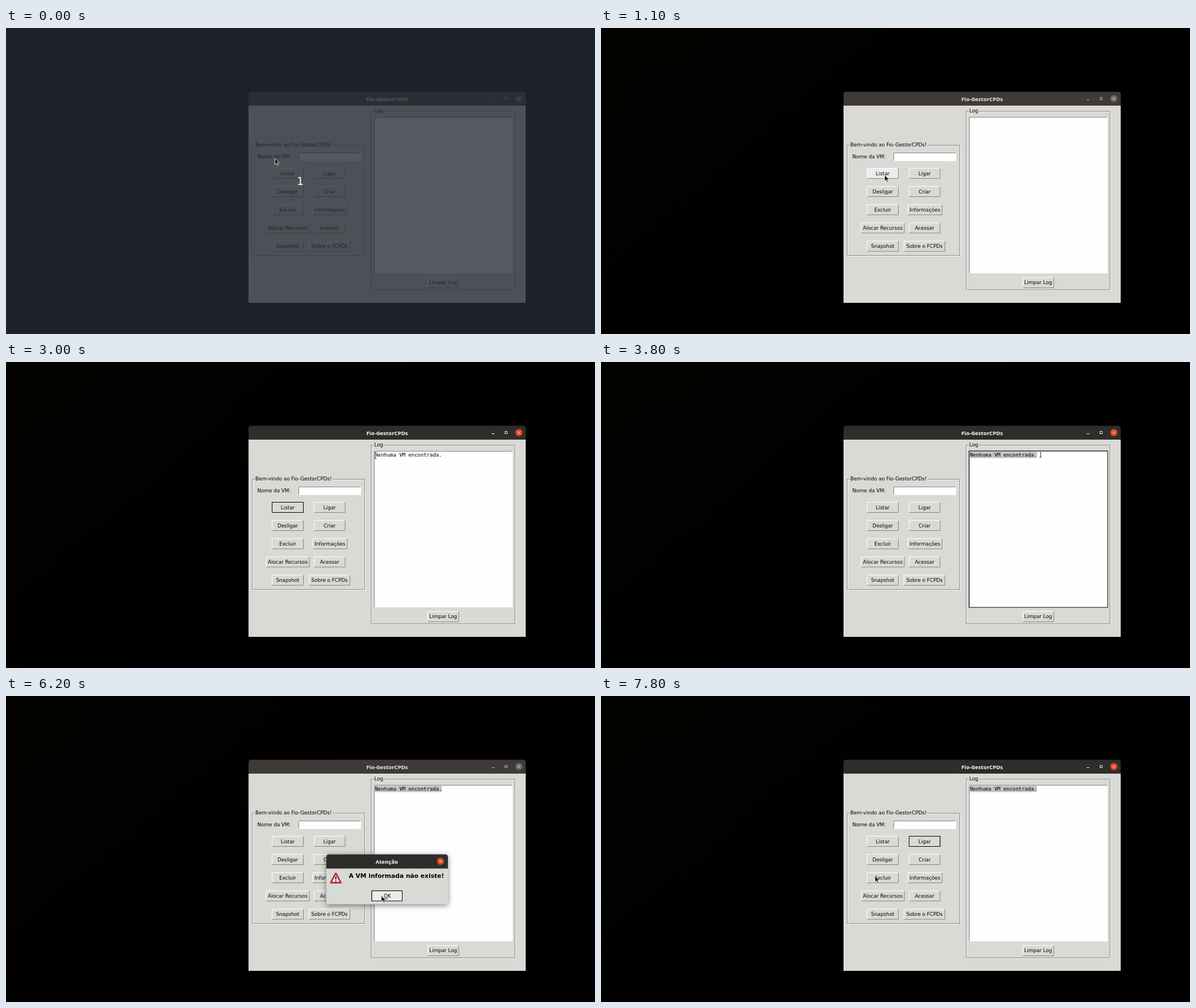
An HTML page that plays this animation: 1037x540 px, repeating every 8000 ms.

```html
<!DOCTYPE html>
<html lang="pt-BR">
<head>
<meta charset="utf-8">
<title>Fio-GestorCPDs</title>
<style>
  html, body { margin: 0; width: 100%; height: 100%; overflow: hidden; background: #000; }
  svg { display: block; width: 1037px; height: 540px; }
  text { font: 8.78px "DejaVu Sans", sans-serif; fill: #000; white-space: pre; }
  .mid { text-anchor: middle; }
  .title { font: bold 9.6px "Noto Sans", sans-serif; fill: #fff; }
  .mono { font: 8.91px "DejaVu Sans Mono", monospace; }
  .msg { font: bold 10.73px "DejaVu Sans", sans-serif; }
  .count { font-size: 19px; fill: #fff; }
  .face { fill: #d9dad6; }
  .light, .dark, .ring { fill: none; stroke-width: 1; }
  .light { stroke: #fff; }
  .dark { stroke: #84857f; }
  .ring { stroke: #000; visibility: hidden; }
  .focus > .ring { visibility: visible; }
  .hover > .face { fill: #ececec; }
  .press > .light { stroke: #84857f; }
  .press > .dark { stroke: #fff; }
  .press > text { transform: translate(.7px, .7px); }
  .bar { fill: #2f2d2c; }
  .close { fill: #e2481f; }
  .ctl { fill: none; stroke: #f2f2f2; }
  .idle .bar { fill: #3f3a38; }
  .idle .close { fill: #6b6765; }
  .idle .ctl { stroke: #b9b6b4; }
  .idle .title { fill: #eee; }
  .idle .x { stroke: #f2f2f2; }
  .shade { filter: drop-shadow(0 2px 5px rgba(0, 0, 0, .5)); }
</style>
</head>
<body>
<svg viewBox="0 0 1037 540">
  <defs>
    <linearGradient id="wall" x2="1" y2=".6">
      <stop stop-color="#040300"/><stop offset=".6" stop-color="#000"/>
    </linearGradient>
  </defs>
  <rect width="1037" height="540" fill="url(#wall)"/>
  <rect y="538" width="1037" height="2" fill="#0b0208"/>

  <g id="main">
    <path class="bar" d="M427 137.500V117q0-4.500 4.500-4.500H910.500q4.500 0 4.500 4.500v20.500z"/>
    <rect class="face" x="427" y="137" width="488" height="348"/>
    <text class="title mid" x="671" y="128.500">Fio-GestorCPDs</text>
    <path class="ctl" d="M855 126.500h5M878.500 122.500h4v4h-4z"/>
    <circle class="close" cx="903" cy="124.500" r="6.200"/>
    <path class="ctl x" d="M900.800 122.300l4.400 4.400m0-4.400l-4.400 4.400"/>
    <g id="groups"></g>
    <text x="442.500" y="230">Nome da VM:</text>
    <g id="entry"></g>
    <g id="log"></g>
    <rect id="sel" x="649.500" y="158.500" height="11" fill="#c3c3c3"/>
    <text id="line" class="mono" x="649.500" y="167.200">Nenhuma VM encontrada.</text>
    <g id="buttons"></g>
  </g>

  <g id="dialog">
    <g class="shade">
      <path class="bar" d="M564 305V284q0-4.500 4.500-4.500H773.500q4.500 0 4.500 4.500v21z"/>
      <rect class="face" x="564" y="304.500" width="214" height="63"/>
    </g>
    <text class="title mid" x="670.500" y="296">Atenção</text>
    <circle class="close" cx="765" cy="291.700" r="6.200"/>
    <path class="ctl" d="M762.800 289.500l4.400 4.400m0-4.400l-4.400 4.400"/>
    <path d="M580.700 313.500L589 329H572.400z" fill="#fff" stroke="#8d1416" stroke-width="3.400" stroke-linejoin="round"/>
    <path d="M580.700 313.500L589 329H572.400z" fill="#eee" stroke="#d5282a" stroke-width="2" stroke-linejoin="round"/>
    <path d="M580.700 318.800v5m0 1.800v1.900" stroke="#111" stroke-width="2"/>
    <text class="msg" x="603.500" y="320.500">A VM informada não existe!</text>
    <g id="okSlot"></g>
  </g>

  <g id="intro">
    <rect width="1037" height="540" fill="#262b34" fill-opacity=".78"/>
    <text class="count mid" x="518" y="277">1</text>
  </g>

  <g id="cursor">
    <path id="arrow" d="M.3.300V11.300L2.900 9 4.700 13 6.600 12.200 4.900 8.300H8.200z" fill="#111" stroke="#fff" stroke-width=".8"/>
    <g id="beam" fill="none">
      <path d="M-2-6H2M0-6V6M-2 6H2" stroke="#fff" stroke-width="2.400"/>
      <path d="M-2-6H-.700L0-5.300.700-6H2M0-5.300V5.300M-2 6H-.700L0 5.300.700 6H2" stroke="#111"/>
    </g>
    <path id="sizer" d="M0-6.500L3-2H-3zM0 6.500L3 2H-3z" fill="#111" stroke="#fff" stroke-width=".5"/>
  </g>
</svg>
<script>
const LOOP = 8000, CHAR = 5.364;
const el = id => document.getElementById(id);

// Two-tone bevel: top-left corner and bottom-right corner lines
const corners = (x, y, w, h, first, second) =>
  `<path class="${first}" d="M${x + .5} ${y + h - .5}V${y + .5}H${x + w - .5}"/>` +
  `<path class="${second}" d="M${x + w - .5} ${y + .5}V${y + h - .5}H${x + .5}"/>`;

const ring = (x, y, w, h) =>
  `<rect class="ring" x="${x + .5}" y="${y + .5}" width="${w - 1}" height="${h - 1}"/>`;

const button = (id, label, x, cy, w, html = label) => {
  const y = cy - 9.5;
  return `<g id="${id}"><rect class="face" x="${x}" y="${y}" width="${w}" height="19"/>` +
    corners(x, y, w, 19, 'light', 'dark') + ring(x, y, w, 19) +
    `<text class="mid" x="${x + w / 2}" y="${cy + 3}">${html}</text></g>`;
};

const field = (x, y, w, h) =>
  `<rect x="${x}" y="${y}" width="${w}" height="${h}" fill="#fefefe"/>` +
  corners(x, y, w, h, 'dark', 'light');

const group = (x, y, w, h, label, gap) =>
  `<rect class="light" x="${x + 1.5}" y="${y + 1.5}" width="${w - 1}" height="${h - 1}"/>` +
  `<rect class="dark" x="${x + .5}" y="${y + .5}" width="${w - 1}" height="${h - 1}"/>` +
  `<rect class="face" x="${x + 5}" y="${y - 2}" width="${gap}" height="6"/>` +
  `<text x="${x + 6}" y="${y + 2.7}">${label}</text>`;

el('groups').innerHTML =
  group(433, 206.5, 199, 195.5, 'Bem-vindo ao Fio-GestorCPDs!', 137) +
  group(642.5, 146.5, 254, 316, 'Log', 17);
el('entry').innerHTML = field(515, 220, 110, 14.5);
el('log').innerHTML = field(648, 157, 244, 276) + ring(647.5, 156.5, 245, 277);
el('buttons').innerHTML =
  button('list', 'Listar', 468, 256.5, 56) +
  button('start', 'Ligar', 542, 256.5, 55.5) +
  button('stop', 'Desligar', 468, 288.5, 56) +
  button('make', 'Criar', 542, 288.5, 55.5) +
  button('drop', 'Excluir', 468, 320.7, 56) +
  button('info', 'Informações', 539.5, 320.7, 61.5) +
  button('alloc', 'Alocar Recursos', 457.5, 352.8, 77) +
  button('open', 'Acessar', 542, 352.8, 55.5) +
  button('snap', 'Snapshot', 468, 385, 56) +
  button('about', 'Sobre o FCPDs', 533, 385, 73) +
  button('clear', 'Limpar Log', 742, 449.3, 55.5);
el('okSlot').innerHTML =
  button('ok', 'OK', 643.5, 352.7, 54.5, '<tspan text-decoration="underline">O</tspan>K');

// Pointer path: time, x, y, shape (held until the next entry)
const A = 'arrow', I = 'beam', S = 'sizer';
const path = [
  [0, 473, 229.5, A], [300, 489, 225, A], [400, 537.5, 216.5, A], [600, 553, 240, A],
  [700, 566, 261, A], [900, 553, 263, A], [1000, 525, 262, A], [1100, 499, 259, A],
  [1800, 528, 246, A], [1900, 592, 222, A], [2000, 647, 207.5, I],
  [2200, 660, 203, I], [2300, 678, 196, I], [2400, 690, 188, I], [2500, 684, 180, I],
  [2600, 672, 174, I], [2700, 661, 169, I], [2800, 653, 166, I], [2900, 648, 165, I],
  [3000, 650, 164.5, I], [3300, 688, 164, I], [3400, 729, 163, I], [3500, 762, 163, I],
  [3800, 774, 162, I], [4000, 684, 196, I], [4100, 563, 251.5, A], [4300, 560, 251.5, A],
  [4900, 691, 257, S], [5000, 768, 300, A], [5100, 718, 359, A], [5200, 657.5, 351.5, A],
  [5400, 660.5, 352, A], [6400, 622, 306, A], [6500, 575, 267, A], [6600, 548, 252, A],
  [6700, 534.5, 245.5, A], [6900, 534.5, 251, A], [7300, 551, 295.5, A],
  [7500, 489, 337, A], [7700, 486, 328, A], [7800, 482, 317, A]
];

// Widget states: start, end, widget
const states = {
  hover: [[700, 1000, 'start'], [1100, 1800, 'list'], [4100, 4500, 'start'],
          [5200, 6300, 'ok'], [7300, 7500, 'info'], [7500, 7700, 'drop']],
  press: [[1300, 1400, 'list'], [4300, 4400, 'start'], [6200, 6300, 'ok']],
  focus: [[1300, 3200, 'list'], [3200, 4300, 'log'], [4300, 4500, 'start'],
          [4500, 6300, 'ok'], [6300, LOOP, 'start']]
};

const within = (t, from, to) => t >= from && t < to;
const show = (id, on) => { el(id).style.display = on ? '' : 'none'; };

function draw() {
  const t = performance.now() % LOOP;
  const [, x, y, shape] = path.findLast(p => p[0] <= t);
  el('cursor').setAttribute('transform', `translate(${x} ${y})`);
  for (const s of [A, I, S]) show(s, s === shape);

  for (const [name, spans] of Object.entries(states)) {
    for (const [, , id] of spans) el(id).classList.remove(name);
    for (const [from, to, id] of spans)
      if (within(t, from, to)) el(id).classList.add(name);
  }

  const dialog = within(t, 4500, 6300);
  show('dialog', dialog);
  show('intro', t < 300);
  show('line', t >= 1400);
  el('main').classList.toggle('idle', t < 1300 || dialog);

  const chars = t < 3200 ? 0 : t < 3800 ? Math.round((x - 649.5) / CHAR) : 22;
  el('sel').setAttribute('width', Math.min(chars, 22) * CHAR);
  requestAnimationFrame(draw);
}
draw();
</script>
</body>
</html>
```
